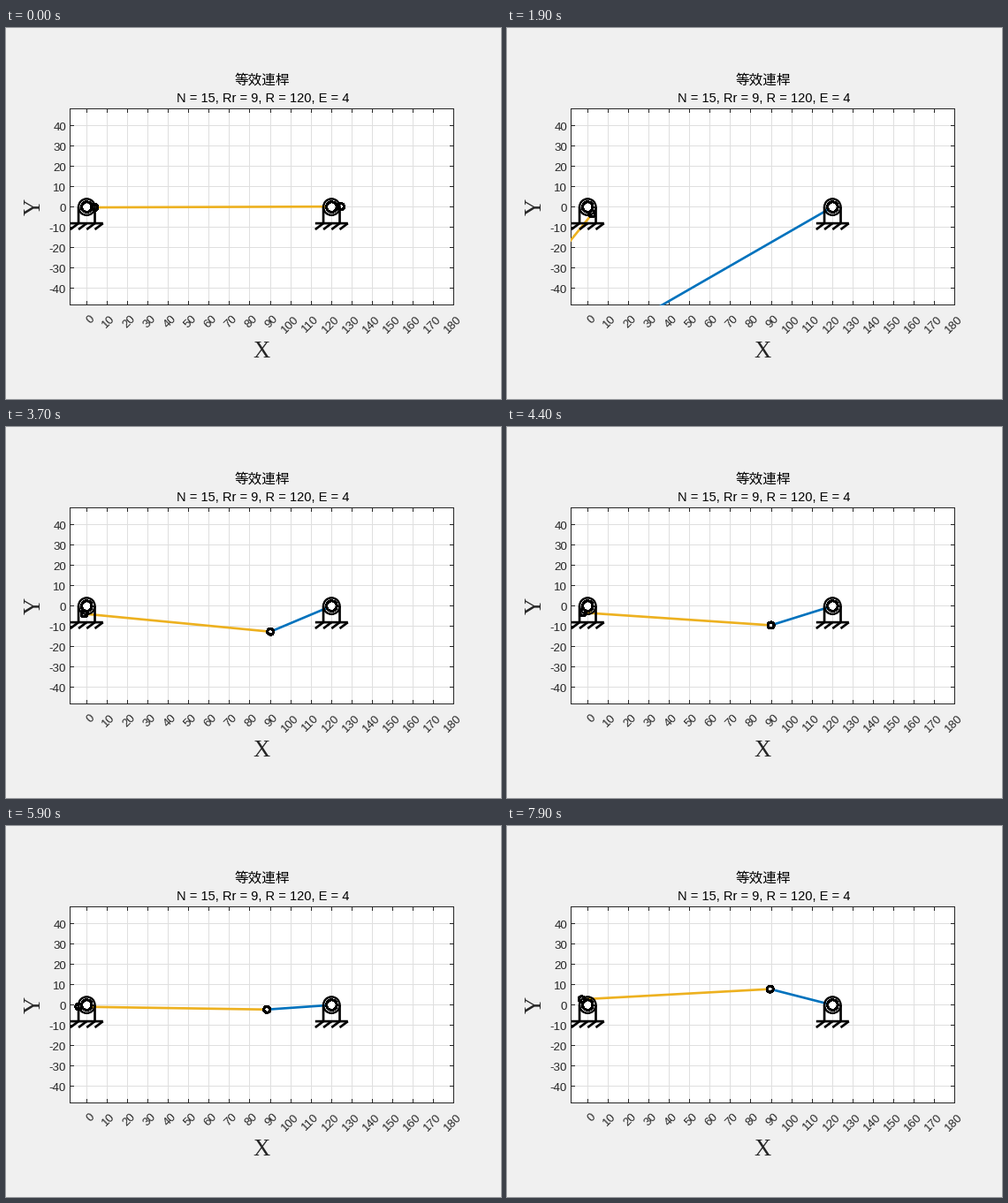
Write a matplotlib script that moves like this. It is 560 by 420 pixels and loops after 8000 ms.

```python
import numpy as np
import matplotlib.pyplot as plt
from matplotlib.animation import FuncAnimation
from matplotlib.patches import Circle, Rectangle
from matplotlib.transforms import Affine2D

W, H, DPI = 560, 420, 80
PX = 72 / DPI                      # points per pixel
N, R, E = 15, 120, 4               # pins, pin circle radius, eccentricity
STEP = np.radians(2.8)             # crank turn per frame
K = 434 / 188                      # pixels per data unit
X0, Y0 = 72.8 + 8 * K, 202.65      # place of the data zero
LEFT, RIGHT, TOP, BOTTOM = 72.8, 506.8, Y0 - 48 * K, Y0 + 48 * K
DARK, GRID = "#262626", "#dfdfdf"
BLUE, YELLOW = "#0072BD", "#EDB120"

fig = plt.figure(figsize=(W / DPI, H / DPI), dpi=DPI, facecolor="#f0f0f0")
ax = fig.add_axes([0, 0, 1, 1])
ax.set_xlim(0, W)
ax.set_ylim(H, 0)
ax.axis("off")
data = Affine2D().scale(K, -K).translate(X0, Y0) + ax.transData
clip = Rectangle((72, 91), 435, 223, transform=ax.transData)


def thin(xs, ys, color, z):
    """Line one pixel wide that fills whole pixels."""
    ax.plot(np.floor(xs) + 0.5, np.floor(ys) + 0.5, color=color, lw=PX,
            zorder=z, snap=False, solid_capstyle="projecting")


def label(x, y, text, size, color=DARK, font="Liberation Sans", **kw):
    opts = dict(ha="center", va="center_baseline", rotation_mode="anchor")
    ax.text(x, y, text, fontsize=size * PX, color=color, family=font,
            **{**opts, **kw})


def stroke(xs, ys, width, color, z):
    line, = ax.plot(xs, ys, color=color, lw=width * PX, zorder=z, snap=False,
                    transform=data, solid_capstyle="butt")
    line.set_clip_path(clip)
    return line


def ring(x, y, r, width, fill, z, smooth=False):
    c = Circle((x, y), r, ec="black", fc=fill, lw=width * PX, zorder=z,
               transform=data, antialiased=smooth)
    ax.add_patch(c)
    c.set_clip_path(clip)
    return c


def support(x):
    stroke([x - 4, x - 4], [0, -8], 2.67, "black", 6)
    stroke([x + 4, x + 4], [0, -8], 2.67, "black", 6)
    stroke([x - 8, x + 8], [-8, -8], 2.67, "black", 6)
    for d in (-4, 0, 4, 8):
        stroke([x + d, x + d - 4], [-8, -11], 2.67, "black", 6)
    ring(x, 0, 4, 2.4, "none", 6, smooth=True)
    ring(x, 0, 2.5, 2, "white", 7)


def draw_axes():
    ax.add_patch(Rectangle((LEFT, TOP), RIGHT - LEFT, BOTTOM - TOP,
                           fc="white", ec="none", zorder=0))
    for v in range(0, 181, 10):
        x = X0 + K * v
        if v < 180:
            thin([x, x], [TOP, BOTTOM], GRID, 1)
        thin([x, x], [TOP, TOP + 4], DARK, 2)
        thin([x, x], [BOTTOM - 4, BOTTOM], DARK, 2)
        label(x + 5.9, 326.7, str(v), 13.33, ha="right", rotation=45)
    for v in range(-40, 41, 10):
        y = Y0 - K * v
        thin([LEFT, RIGHT], [y, y], GRID, 1)
        thin([LEFT, LEFT + 4], [y, y], DARK, 2)
        thin([RIGHT - 4, RIGHT], [y, y], DARK, 2)
        label(68, y + 0.9, str(v), 13.33, ha="right")
    for x in (LEFT, RIGHT):
        thin([x, x], [TOP, BOTTOM], DARK, 2)
    for y in (TOP, BOTTOM):
        thin([LEFT, RIGHT], [y, y], DARK, 2)
    label(290, 59.5, "等效連桿", 15.6, "black", "Noto Sans CJK JP", va="center")
    label(290.4, 79, "N = 15, Rr = 9, R = 120, E = 4", 14.67, "black")
    label(289.5, 363.5, "X", 26.67, font="Liberation Serif")
    label(29.5, 202.5, "Y", 26.67, font="Liberation Serif", rotation=90)


draw_axes()
support(0)
support(R)
follower = stroke([], [], 2.67, BLUE, 3)
coupler = stroke([], [], 2.67, YELLOW, 4)
joints = [ring(0, 0, 1.5, 2, "white", 5) for _ in range(2)]


def linkage(angle):
    """Crank end and centre of curvature of the cycloid at the pin."""
    turn = np.exp(-1j * angle)
    vel = R - N * E * turn
    acc = N * N * E * turn - R
    return E * turn, R + vel * abs(vel) ** 2 / (vel.conjugate() * acc).real


def update(i):
    a, c = linkage(STEP * (i + 1))
    follower.set_data([R, c.real], [0, c.imag])
    coupler.set_data([a.real, c.real], [a.imag, c.imag])
    for joint, p in zip(joints, (a, c)):
        joint.center = p.real, p.imag
    return [follower, coupler, *joints]


anim = FuncAnimation(fig, update, frames=80, interval=100, repeat=True,
                     repeat_delay=0, blit=False)
plt.show()
```
